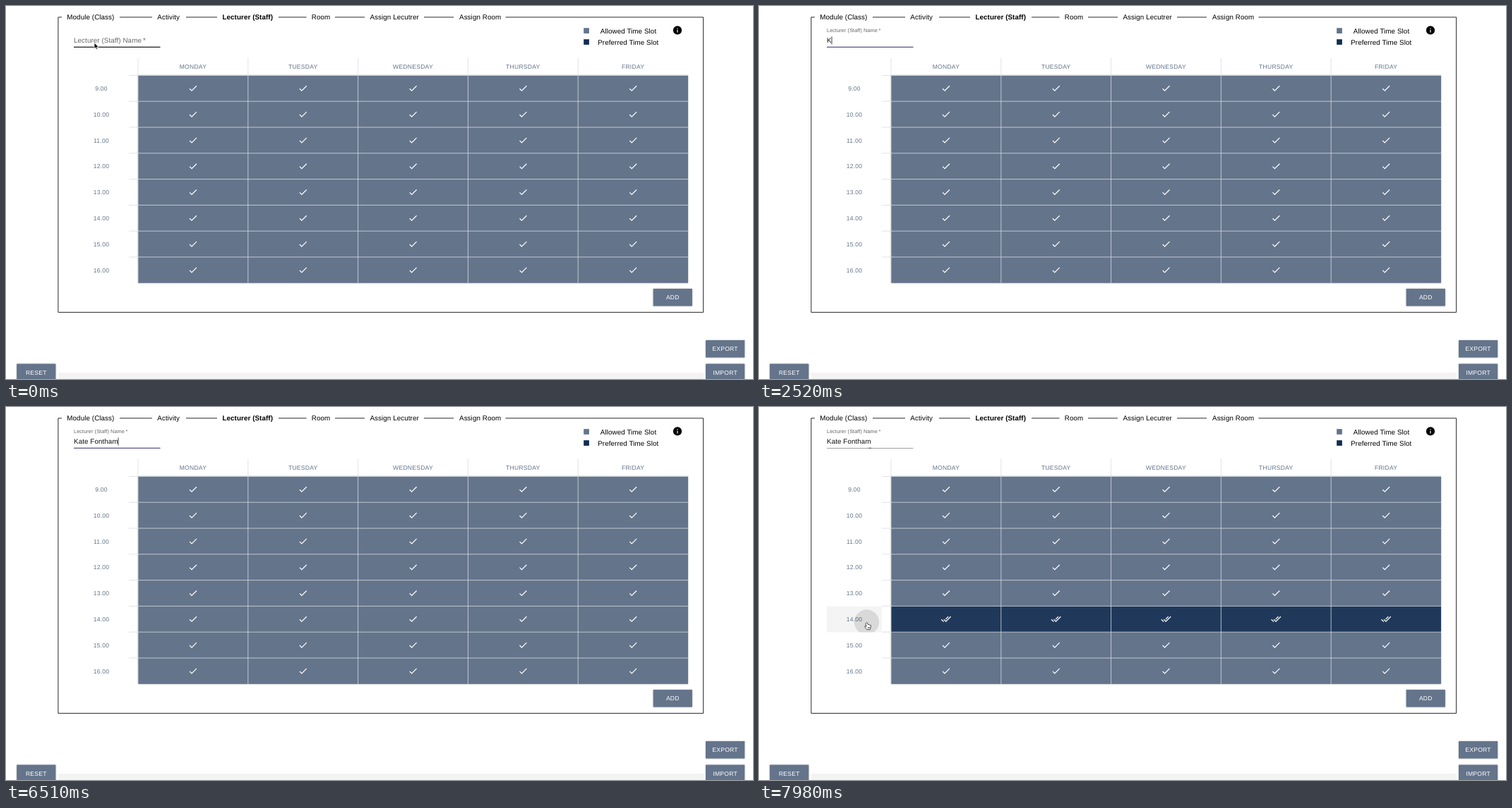
An HTML page for the animation above (8000 ms loop, 1058x529 px).

```html
<!DOCTYPE html>
<html lang="en">
<head>
<meta charset="utf-8">
<title>Lecturer time slots</title>
<style>
  html, body { margin: 0; width: 100%; height: 100%; overflow: hidden; background: #fff; }
  svg { display: block; width: 100vw; height: 100vh; }
  text { font: 9.8px "Liberation Sans", Arial, sans-serif; letter-spacing: .00938em; white-space: pre; text-rendering: geometricPrecision; }
  .small { font-size: 8.57px; letter-spacing: .02857em; text-anchor: middle; fill: #64748b; }
  .button text { fill: #fff; }
  .raised { filter: drop-shadow(0 .8px 1.2px rgba(0,0,0,.3)); }
  .cursor { stroke-width: .8; stroke-linejoin: round; }
</style>
</head>
<body>
<svg viewBox="0 0 1058 529" preserveAspectRatio="none">
  <rect x="74" y="520" width="914" height="9" fill="#f3f3f3"/>
  <path id="frame" fill="none" stroke="#111" stroke-width=".9"/>
  <g id="tabs"></g>

  <rect x="818.2" y="31.2" width="7.7" height="7.7" fill="#64748b"/>
  <rect x="818.2" y="47.2" width="7.7" height="7.7" fill="#122d51"/>
  <text x="841.8" y="38.6">Allowed Time Slot</text>
  <text x="838.2" y="54.8">Preferred Time Slot</text>
  <circle cx="951" cy="34.4" r="6.1"/>
  <path d="M950.4 31.3h1.2v1.2h-1.2zM950.4 33.8h1.2v3.7h-1.2z" fill="#fff"/>

  <rect id="hover" x="96" y="282.6" width="78" height="36.8"/>
  <g id="grid"></g>
  <clipPath id="headerClip"><rect x="96" y="282.6" width="78" height="36.8"/></clipPath>
  <circle id="ripple" cx="152.5" cy="305" fill-opacity=".11" clip-path="url(#headerClip)"/>
  <g id="buttons"></g>

  <rect id="base" x="96" width="122.5"/>
  <rect id="focus" y="57.7" height="1.2" fill="#5b5184"/>
  <text id="label" fill="#666">Lecturer (Staff) Name&#8201;*</text>
  <text id="typed" x="96" y="52.4" fill="#111"></text>
  <rect id="caret" y="43.4" width=".8" height="11" fill="#111"/>

  <path id="arrow" class="cursor" d="M0 0v8.7l2-1.9 1.4 3 1.5-.7-1.4-2.9h2.7z" stroke="#fff"/>
  <path id="beam" class="cursor" d="M-1.9-4.6Q0-4.6 0-3.5 0-4.6 1.9-4.6M0-3.5V3.5M-1.9 4.6Q0 4.6 0 3.5 0 4.6 1.9 4.6M-1 1.2h2" fill="none" stroke="#222"/>
  <path id="hand" class="cursor" d="M-2-4.4q1-1 1.6.2L.3-1.8q1-.7 1.5.2 1-.5 1.4.4 1.3-.3 1.3 1L4 2.6 3.3 5.2H-1.2L-3.6 2-4.4.5q.5-1 1.6-.1l.8.6-1-4.2zM.6 1.5v2M2.2 1.5v2" fill="#fff" stroke="#222"/>
</svg>
<script>
const LOOP = 8000, STEP = 70;
const COL = 155.8, ROW = 36.8, LEFT = 187, TOP = 98.4, CHOSEN = 5;
const CHECK = "M9 16.17 4.83 12l-1.42 1.41L9 19 21 7l-1.41-1.41z";
const DOUBLE_CHECK = "m18 7-1.41-1.41-6.34 6.34 1.41 1.41zm4.24-1.41L11.66 16.17 7.48 12l-1.41 1.41L11.66 19l12-12zM.41 13.41 6 19l1.41-1.41L1.83 12z";
const NAME = "Kate Fontham";
const KEY_TIMES = [2450, 2870, 3150, 3710, 3990, 4480, 5250, 5530, 5810, 6090, 6230, 6510];
const CARET_ON = [[1190, 1680], [2240, 5040], [5250, 7000], [7560, 7827]];
// Pointer path: time, x, y
const POINTER = [
  [0, 125, 52], [280, 133, 51], [630, 132, 46], [2450, 132, 46],
  [6860, 147, 50], [6930, 232, 125], [7000, 318, 201], [7140, 306, 212],
  [7210, 240, 246], [7280, 183, 270], [7350, 155, 281.5], [7420, 147, 291],
  [7490, 145, 299], [7560, 149, 306], [7630, 154, 310.5]
];

const $ = id => document.getElementById(id);
const clamp = v => Math.min(1, Math.max(0, v));
const mix = (a, b, p) => a + (b - a) * p;
const set = (el, attrs) => { for (const k in attrs) el.setAttribute(k, attrs[k]); return el; };
function add(parent, tag, attrs, content = "") {
  const el = set(document.createElementNS("http://www.w3.org/2000/svg", tag), attrs);
  el.textContent = content;
  return parent.appendChild(el);
}

// CSS-style cubic Bezier easing
function bezier(x1, y1, x2, y2) {
  const at = (a, b, s) => 3 * a * s * (1 - s) ** 2 + 3 * b * s * s * (1 - s) + s ** 3;
  return progress => {
    const x = clamp(progress);
    let lo = 0, hi = 1;
    for (let i = 0; i < 24; i++) {
      const mid = (lo + hi) / 2;
      if (at(x1, x2, mid) < x) lo = mid; else hi = mid;
    }
    return at(y1, y2, hi);
  };
}
const easeOut = bezier(0, 0, .2, 1), easeInOut = bezier(.4, 0, .2, 1);

set($("frame"), { d: "M79 15.9H73.9V434.4H987.6V15.9H707.5M161 15.9H207M255 15.9H299M386 15.9H425.5M466 15.9H508M592 15.9H634" });
[["Module (Class)", 86.3], ["Activity", 214.3], ["Lecturer (Staff)", 306.4], ["Room", 432.8],
 ["Assign Lecutrer", 515.4], ["Assign Room", 642]].forEach(([name, x], i) =>
  add($("tabs"), "text", { x, y: 19.3, style: i === 2 ? "font-weight:bold" : "" }, name));

const grid = $("grid");
add(grid, "rect", { x: LEFT, y: TOP, width: COL * 5, height: ROW * 8, fill: "#64748b", class: "raised" });
const chosenRow = add(grid, "rect", { x: LEFT, y: TOP + ROW * CHOSEN, width: COL * 5, height: ROW });
const chosenChecks = [];
["MONDAY", "TUESDAY", "WEDNESDAY", "THURSDAY", "FRIDAY"].forEach((day, c) => {
  const x = LEFT + COL * c, mid = x + COL / 2;
  add(grid, "text", { x: mid, y: 89.2, class: "small" }, day);
  add(grid, "path", { d: `M${x} 73.5V${TOP + ROW * 8}`, stroke: "#d9dce1", "stroke-width": .8 });
  for (let r = 0; r < 8; r++) {
    const y = TOP + ROW * (r + .5);
    const check = add(grid, "path", { d: CHECK, fill: "#fff", transform: `translate(${mid - 7.35} ${y - 7.35}) scale(.6123)` });
    if (r === CHOSEN) chosenChecks.push(check);
  }
});
for (let r = 0; r < 8; r++) {
  const y = TOP + ROW * r;
  add(grid, "path", { d: `M174 ${y}H${LEFT + COL * 5}`, stroke: "#d9dce1", "stroke-width": .8 });
  add(grid, "text", { x: 135, y: y + 21.5, class: "small" }, `${9 + r}.00`);
}

[["ADD", 916.7, 401], ["EXPORT", 991, 474], ["IMPORT", 991, 507.6], ["RESET", 15.2, 507.6]].forEach(([name, x, y]) => {
  const button = add($("buttons"), "g", { class: "button" });
  add(button, "rect", { x, y, width: 55.2, height: 24.5, rx: .5, fill: "#64748b", class: "raised" });
  add(button, "text", { x: x + 27.6, y: y + 15.3, class: "small", style: "fill:#fff" }, name);
});

function drawField(t) {
  const float = easeOut((t - 1185) / 200);
  const focus = float * (1 - easeOut((t - 7827) / 200));
  set($("label"), { transform: `translate(96 ${mix(52.4, 36.6, float)}) scale(${mix(1, .75, float)})` });
  set($("focus"), { x: 157.2 - 61.25 * focus, width: 122.5 * focus });
  const hovered = t < 1400;
  set($("base"), { y: hovered ? 57.7 : 58, height: hovered ? 1.2 : .7, fill: hovered ? "#111" : "#777" });

  $("typed").textContent = NAME.slice(0, KEY_TIMES.filter(k => k <= t).length);
  set($("caret"), {
    x: 96 + $("typed").getComputedTextLength(),
    opacity: CARET_ON.some(([from, to]) => t >= from && t < to) ? 1 : 0
  });
}

function drawRow(t) {
  const p = easeInOut((t - 7862) / 215);
  const rgb = [[100, 18], [116, 45], [139, 81]].map(([a, b]) => Math.round(mix(a, b, p)));
  set(chosenRow, { fill: `rgb(${rgb})` });
  chosenChecks.forEach(c => set(c, { d: t >= 7862 ? DOUBLE_CHECK : CHECK }));
  set($("hover"), { "fill-opacity": .045 * easeInOut((t - 7400) / 250) });
  set($("ripple"), { r: Math.max(0, (t - 7882) * .18) });
}

function drawPointer(t) {
  const [, x, y] = POINTER.filter(p => p[0] <= t).pop();
  const hidden = t >= 2450 && t < 6860;
  const shape = hidden ? "" : t < 280 ? "arrow" : t < 6930 ? "beam" : "hand";
  for (const id of ["arrow", "beam", "hand"])
    set($(id), { transform: `translate(${x} ${y})`, visibility: id === shape ? "visible" : "hidden" });
}

function draw() {
  const t = Math.floor(performance.now() % LOOP / STEP) * STEP;
  drawField(t);
  drawRow(t);
  drawPointer(t);
  requestAnimationFrame(draw);
}
draw();
</script>
</body>
</html>
```
